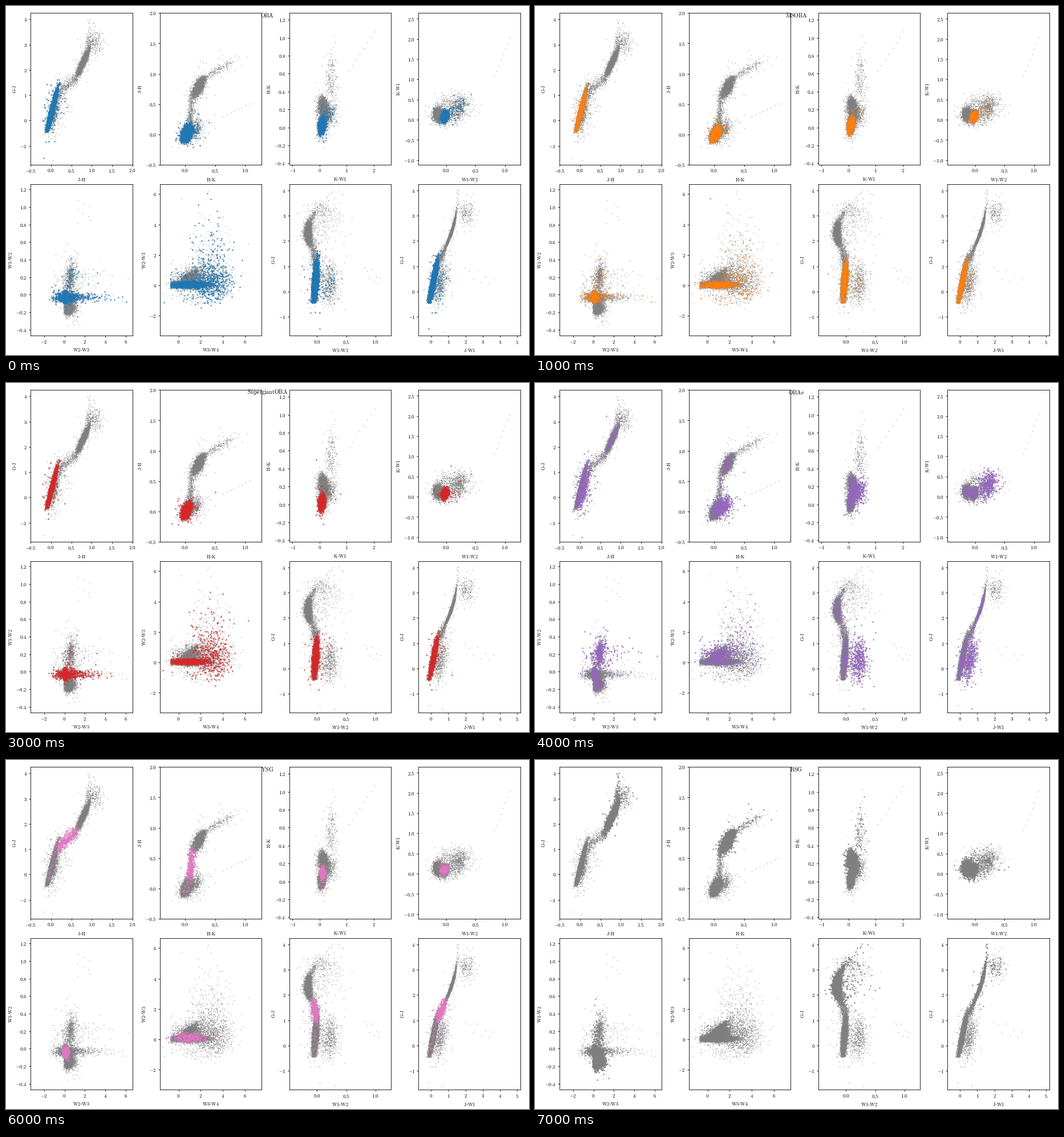
Recreate the animation shown at these times as a matplotlib script. Size 917 by 611 pixels, loop 8 s.

```python
import numpy as np
import matplotlib.pyplot as plt
from matplotlib.animation import FuncAnimation
from matplotlib.ticker import FuncFormatter, MaxNLocator

W, H, DPI = 917, 611, 64
PT = 72 / DPI  # points per pixel
plt.rcParams.update({"font.family": "Liberation Serif", "mathtext.fontset": "cm"})

rng = np.random.default_rng(4)


def noise(n, sd):
    return rng.normal(0, sd, n)


def tail(n, share, scale):
    return rng.exponential(scale, n) * (rng.random(n) < share)


def stars(gj, jh, hk, kw, w12, w23, w34, wild=0.03):
    """Stack the seven colours and throw a few stars off their sequence."""
    s = np.column_stack([gj, jh, hk, kw, w12, w23, w34])
    odd = rng.random((len(s), 1)) < wild
    return s + odd * rng.normal(0, 1, s.shape) * s.std(axis=0).clip(0.1, 0.6)


def hot(n, dusty=0.2, wild=0.03):
    gj = np.clip(0.4 + noise(n, 0.4), -0.45 + tail(n, 1, 0.1), 1.5)
    jh = -0.045 + 0.155 * gj + noise(n, 0.024)
    hk = 0.02 + 0.3 * jh + noise(n, 0.035)
    kw = 0.04 + 0.09 * gj + noise(n, 0.045)
    w12 = -0.04 + 0.03 * gj + noise(n, 0.024)
    far = rng.random(n) < dusty
    w23 = 0.05 + np.where(far, noise(n, 0.55) + tail(n, 0.45, 1.1), noise(n, 0.1))
    w34 = np.where(far, 2.9 + noise(n, 0.9), np.maximum(0.9 + noise(n, 0.8), -0.7))
    return stars(gj, jh, hk, kw, w12, w23, w34, wild)


def emission(n, wild=0.2):
    """Hot stars with an infrared excess."""
    f = rng.beta(4, 1.3, n)
    gj, jh, hk, kw, w12, w23, w34 = hot(n, 0.2, 0).T
    return stars(gj - 0.1 * f, jh + 0.09 * f + noise(n, 0.03),
                 hk + 0.16 * f + noise(n, 0.04), kw + 0.28 * f + noise(n, 0.12),
                 w12 + 0.31 * f + noise(n, 0.04), w23 + 0.68 * f + noise(n, 0.12),
                 w34 + 0.2 * f, wild)


def shell(n):
    """Extreme excess along one reddening line."""
    u = (np.arange(n) + 0.5) / n
    return stars(0.5 + noise(n, 0.3), 0.28 + 0.24 * u, 0.6 + 0.5 * u, 1 + 1.1 * u,
                 0.8 + 0.3 * u, 2 + noise(n, 0.4), 2.2 + noise(n, 0.3), 0)


def yellow(n):
    u = rng.random(n)
    return stars(1.05 + 0.65 * u + noise(n, 0.11), 0.17 + 0.42 * u + noise(n, 0.05),
                 0.07 + 0.05 * u + noise(n, 0.03), 0.1 + noise(n, 0.05),
                 -0.02 - 0.04 * u + noise(n, 0.03), 0.1 + noise(n, 0.17),
                 0.9 + noise(n, 0.8))


def red(n):
    d = noise(n, 0.29) + tail(n, 0.1, 0.35)
    gj = 2.3 + d
    jh = np.minimum(0.78 + 0.26 * d, 0.92) + noise(n, 0.036)
    hk = 0.22 + 0.45 * (jh - 0.78) + noise(n, 0.042)
    kw = 1.14 + 0.5 * d - 0.15 * d**2 + noise(n, 0.035) - jh - hk
    w12 = -0.16 + 0.17 * (d - 0.05) ** 2 + noise(n, 0.033) + tail(n, 0.06, 0.15)
    w34 = np.maximum(0.8 + noise(n, 0.5), -0.5)
    w23 = 0.12 + 0.65 * np.maximum(w34, 0) * rng.random(n) + noise(n, 0.1)
    return stars(gj, jh, hk, kw, w12, w23, w34, 0.015)


def carbon(n):
    jh = 1.08 + noise(n, 0.08)
    return stars(3.1 + noise(n, 0.25), jh, 0.46 + 1.4 * (jh - 1) + noise(n, 0.06),
                 0.42 + noise(n, 0.1), 0.1 + noise(n, 0.13),
                 0.6 + noise(n, 0.25), 1 + noise(n, 0.5), 0.1)


def with_sum(*parts):
    s = np.vstack(parts)
    return np.column_stack([s, s[:, 1:4].sum(axis=1)])


groups = {
    "OBA": with_sum(hot(2000, 0.25), emission(45)),
    "MSOBA": with_sum(hot(700), emission(15)),
    "EvolvedOBA": with_sum(hot(800, 0.1), emission(20)),
    "SupergiantOBA": with_sum(hot(1100, 0.35), emission(12)),
    "OBAe": with_sum(emission(430), hot(170), red(110), yellow(15)),
    "OB[e]": with_sum(shell(8), emission(12, 0)),
    "YSG": with_sum(yellow(300), hot(30)),
    "RSG": with_sum(red(2300), carbon(30)),
}
names = list(groups)
everything = np.vstack([*groups.values(), with_sum(carbon(150))])

LIMITS = {
    "G-J": (-1.755, 4.25), "J-H": (-0.5, 2), "H-K": (-0.416, 1.275),
    "K-W1": (-1.12, 2.64), "W1-W2": (-0.47, 1.263), "W2-W3": (-3.32, 6.66),
    "W3-W4": (-1.68, 7.52), "J-W1": (-0.73, 5.2),
}
COLUMN = {name: i for i, name in enumerate(LIMITS)}
PANELS = [
    ("J-H", "G-J"), ("H-K", "J-H"), ("K-W1", "H-K"), ("W1-W2", "K-W1"),
    ("W2-W3", "W1-W2"), ("W3-W4", "W2-W3"), ("W1-W2", "G-J"), ("J-W1", "G-J"),
]


def roman(text):
    return "-".join(rf"$\mathrm{{{part}}}$" for part in text.split("-"))


def style_axis(axis, bins):
    axis.set_major_locator(MaxNLocator(bins, steps=[1, 2, 5, 10]))
    step = np.diff(axis.get_majorticklocs())[0]
    digits = 1 if step < 0.9 else 0
    axis.set_major_formatter(FuncFormatter(
        lambda v, _: rf"$\mathrm{{{round(v, 1) + 0.0:.{digits}f}}}$"))


def dots(ax, size, alpha, z):
    return ax.plot([], [], "o", ms=size * PT, mew=0, alpha=alpha, zorder=z)[0]


def make_panel(i, xname, yname):
    left, top = 43.2 + 226.75 * (i % 4), 12.3 + 299.4 * (i // 4)
    width, height = 178.4, 265.7
    ax = fig.add_axes([left / W, 1 - (top + height) / H, width / W, height / H])
    ax.set(xlim=LIMITS[xname], ylim=LIMITS[yname])
    style_axis(ax.xaxis, 6)
    style_axis(ax.yaxis, 9)
    ax.tick_params(length=3 * PT, pad=3 * PT, width=0.85 * PT, labelsize=9 * PT)
    ax.tick_params(axis="x", pad=2.2 * PT)
    ax.spines[:].set_linewidth(0.85 * PT)
    ax.set_xlabel(roman(xname), fontsize=8.4 * PT, labelpad=4.8 * PT)
    ax.set_ylabel(roman(yname), fontsize=8.4 * PT, labelpad=4.3 * PT)

    cols = [COLUMN[xname], COLUMN[yname]]
    back = dots(ax, 1.6, 0.65, 1)
    back.set_color("gray")
    back.set_data(*everything[:, cols].T)
    return dots(ax, 2.8, 0.6, 2), cols


fig = plt.figure(figsize=(W / DPI, H / DPI), dpi=DPI, facecolor="white")
marks = [make_panel(i, *pair) for i, pair in enumerate(PANELS)]
title = fig.text(0.5, 1 - 16 / H, "", fontsize=10 * PT, ha="center", va="center")


def update(k):
    title.set_text(roman(names[k]))
    for mark, cols in marks:
        mark.set_data(*groups[names[k]][:, cols].T)
        mark.set_color(f"C{k}")
    return [title] + [mark for mark, _ in marks]


anim = FuncAnimation(fig, update, frames=len(names), init_func=lambda: update(0),
                     interval=1000, repeat=True)
plt.show()
```
